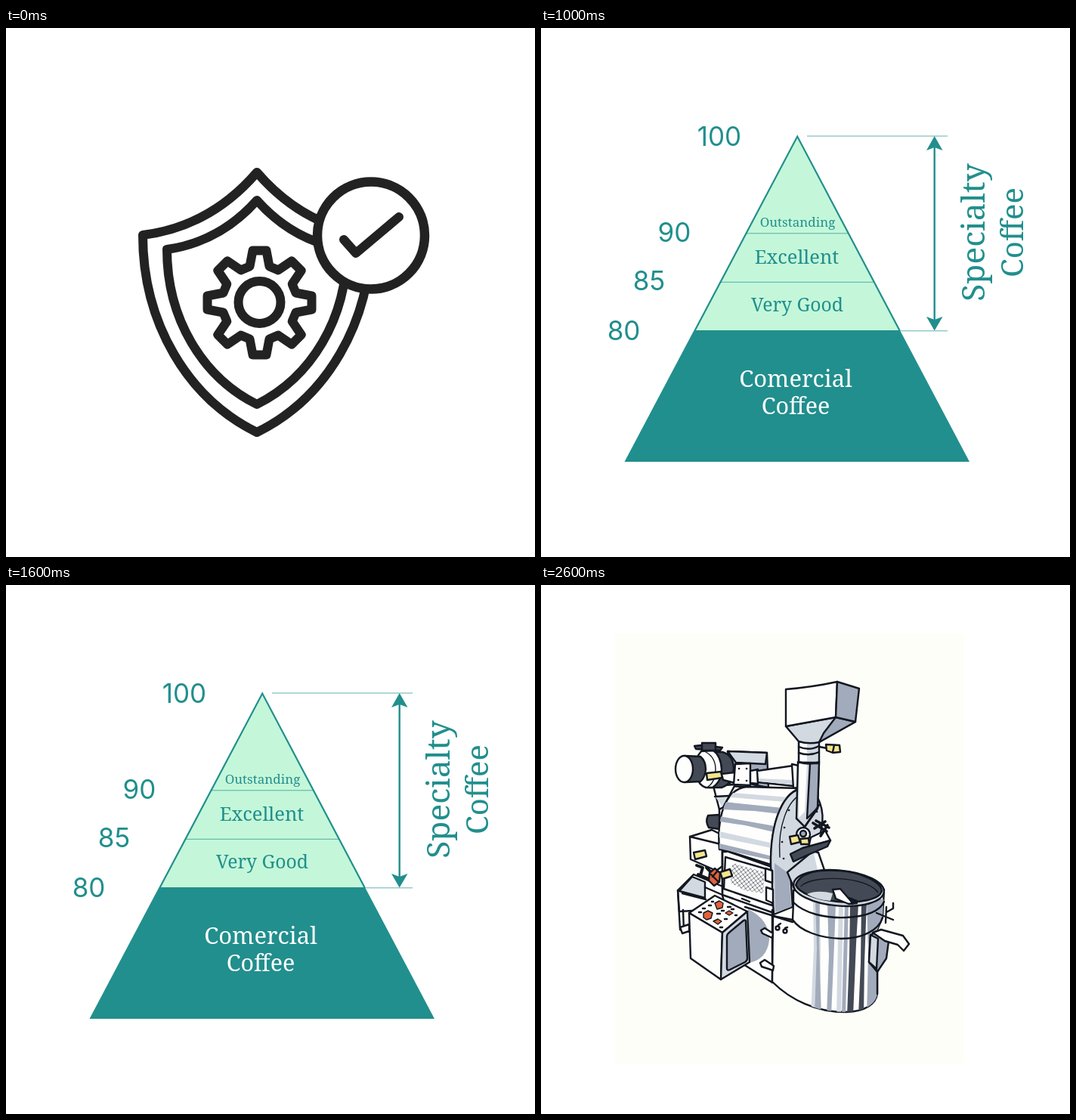
Write an HTML page that moves like this. It is 700x700 px and loops after 3 s.

```html
<!DOCTYPE html>
<html lang="en">
<head>
<meta charset="utf-8">
<title>Coffee quality</title>
<style>
html, body { margin: 0; width: 100%; height: 100%; overflow: hidden; background: #fff; }
svg { display: block; width: 100vw; height: 100vh; }
.scene { visibility: hidden; }
#shield { fill: none; stroke: #222; stroke-width: 12; stroke-linecap: round; stroke-linejoin: round; }
#chart { font-family: "Noto Serif", serif; fill: #218f8d; text-anchor: middle; }
#chart .score { font-family: Inter, sans-serif; }
#chart .rule { stroke: #218f8d; fill: none; }
#roaster { stroke: #121720; stroke-width: 2.4; stroke-linecap: round; stroke-linejoin: round; fill: none; }
.w { fill: #fefefd; }
.l { fill: #d3d9e1; }
.g { fill: #a2abbb; }
.d { fill: #434955; }
.k { fill: #171b24; }
.y { fill: #f5e58b; }
.r { fill: #e2623a; }
.flat { stroke: none; }
.thin { stroke-width: 1.4; }
</style>
</head>
<body>
<svg viewBox="0 0 700 700">
<defs>
  <pattern id="mesh" width="6" height="6" patternUnits="userSpaceOnUse" patternTransform="rotate(8)">
    <path d="M0 0L6 6M6 0L0 6" stroke="#3a404b" stroke-width=".7"/>
  </pattern>
  <clipPath id="drumClip"><path d="M236 350C232 300 247 270 272 267L342 269C318 278 304 315 304 368Z"/></clipPath>
  <clipPath id="binClip"><path d="M334 404L334 444L307 438L306 525C330 549 365 566 405 565C430 564 443 554 445 541L445 456L452 440L454 403C440 432 360 432 334 404Z"/></clipPath>
</defs>

<g class="scene" id="shield">
  <path d="M332 191Q270 263 181 274C181 390 240 490 332 535C424 490 483 390 483 274Q394 263 332 191Z"/>
  <path d="M332 228Q283 283 213 293C213 385 260 462 332 498C404 462 451 385 451 293Q381 283 332 228Z"/>
  <path id="gear"/>
  <circle cx="335.500" cy="363" r="28"/>
  <circle cx="483" cy="274.500" r="71" fill="#fff" stroke-width="12.500"/>
  <path d="M447 280L463 298L520 250"/>
</g>

<g class="scene" id="chart">
  <path d="M339 143L475 400.500H203Z" fill="#c4f7d9"/>
  <path d="M202.500 400H475L567 574H110.500Z"/>
  <path class="rule" stroke-width="2.200" d="M203.500 400.500L339.200 143.500L474.700 400.500"/>
  <path class="rule" opacity=".7" d="M271 271.800H406.500M237 336.300H440.500M352 143H538M474 400.800H538"/>
  <path class="rule" stroke-width="2.400" d="M520.700 155V389"/>
  <path d="M520.700 143L531.500 162L520.700 158L510 162ZM520.700 400.500L531.500 382L520.700 386L510 382Z"/>
</g>

<g class="scene" id="roaster">
  <path class="flat" fill="#fefef9" d="M97 64H560V633.500H97Z"/>

  <!-- motor and air duct -->
  <path class="g" d="M247 220L299 222L301 269L250 266Z"/>
  <path class="l" d="M247 220L299 222L297 237L258 235Z"/>
  <path class="w" d="M228 266L257 264L241 294L236 297Z"/>
  <path class="l flat" d="M231 281L246 280L240 293Z"/>
  <path d="M230 280L248 279M236 296V305"/>
  <path class="d" d="M236 304L221 305Q217 313 222 321L236 323Z"/>
  <path class="d" d="M222 221H240Q255 225 255 244Q254 263 239 268H222Z"/>
  <path class="w" d="M212 220Q203 230 204 245Q206 264 218 268H227Q239 260 239 244Q238 226 228 219Z"/>
  <path class="thin" d="M218 221Q231 228 231 244Q231 260 221 267"/>
  <path class="d" d="M190 226L211 227Q218 233 218 244Q217 255 211 260L190 261Z"/>
  <ellipse class="w" cx="189.500" cy="243.500" rx="11.500" ry="17.500"/>
  <path class="d" d="M203 213L213 212L240 215L237 219L205 217Z"/>
  <path class="d" d="M213 209H231V219H213Z"/>
  <path class="y" d="M219 249L238 247L240 255L220 258Z"/>
  <path class="w" d="M239 250L257 248V262L241 258Z"/>
  <path class="w" d="M257 237L277 236V265L255 264Z"/>
  <path stroke-width="2.600" d="M262 243h.1M272 243h.1M261 258h.1M272 259h.1"/>
  <path class="w" d="M277 246L287 244V263L277 262Z"/>
  <path class="w" d="M286 246L334 239V266L287 261Z"/>
  <path class="l flat" d="M288 256L333 258V264L288 260Z"/>
  <path d="M278 263Q300 270 337 271"/>
  <path class="w" d="M332 237L341 239V268L334 269Z"/>

  <!-- left housing -->
  <path class="w" d="M197 333L226 324L240 331V372L232 378L198 363Z"/>
  <path d="M197 333L238 343"/>
  <path class="w" d="M181 404L202 383L243 400L242 420L218 430L183 432Z"/>
  <path class="l" d="M200 386L217 393V414L183 405Z"/>
  <path d="M181 404L184 456M188 430L189 458M184 456L196 459M187 408L218 416"/>
  <path class="w" d="M184 453L196 449V458L187 461Z"/>
  <path stroke-width="4" d="M206 371L214 374L211 384M208 383L222 389M219 374L225 380"/>
  <path class="y" d="M202 354L217 351L219 359L204 363Z"/>

  <!-- cabinet -->
  <path class="w" d="M240 350L308 374V437L306 526L268 502L240 411Z"/>
  <path class="g flat" d="M274 429Q302 442 302 470Q299 495 276 500Z"/>
  <path d="M217 400L240 410L308 434M306 430V526M270 426L308 438"/>

  <!-- drum -->
  <path class="w" d="M236 350C232 300 247 270 272 267L342 269C318 278 304 315 304 370L240 350Z"/>
  <g class="flat" clip-path="url(#drumClip)">
    <path class="l" d="M254 275L328 281L324 287L250 281ZM236 326L312 343L310 349L236 334Z"/>
    <path class="g" d="M243 287L320 295L317 303L282 299L241 297ZM236 306L315 320L313 328L270 318L236 313ZM236 342L306 359L305 364L236 349Z"/>
  </g>
  <path class="l" d="M304 372C303 312 321 270 349 269C368 273 376 298 371 323C367 348 347 371 330 382L333 426L308 436Z"/>
  <path class="g flat" d="M309 368L328 382L331 426L310 433Z"/>
  <path class="thin" d="M316 360C313 320 326 283 347 276"/>
  <path stroke-width="2.600" d="M322 321h.1M319 340h.1M328 298h.1M321 362h.1M365 300h.1M362 345h.1"/>

  <!-- screened door -->
  <path class="w" d="M244 360L306 378V424L242 402Z"/>
  <path class="flat" fill="url(#mesh)" d="M253 368L296 380L294 408L269 404L251 394Z"/>
  <path class="w" d="M297 375L306 378V394L297 391ZM298 400L307 403V421L298 417Z"/>
  <path d="M266 415L276 419M240 351V408M242 353h3"/>
  <path class="r" d="M223 381L230 375L237 381L236 393L229 398L222 391Z"/>
  <path d="M225 383L234 392M233 379L227 386"/>
  <path class="y" d="M237 380L250 376L253 385L240 389Z"/>

  <!-- hopper -->
  <path class="l" d="M340 234H368L366 296L349 320L338 309Z"/>
  <path class="w flat" d="M342 236H352L349 300L341 308Z"/>
  <path class="g" d="M356 236H368L366 295L352 309Z"/>
  <path d="M338 309L349 320L368 291"/>
  <path class="l" d="M341 207H368V235H341Z"/>
  <path class="w flat" d="M343 209H352V233H343Z"/>
  <path d="M341 214Q355 220 368 213M341 222Q355 227 368 221M341 234Q355 239 368 234"/>
  <path class="l" d="M324 187L390 175L416 181L368 208Q354 211 341 207Z"/>
  <path class="g" d="M390 175L416 181L368 208L374 196Z"/>
  <path class="w" d="M324 138Q360 135 392 128L390 175L324 187Z"/>
  <path class="g" d="M392 128L421 137L416 181L390 175Z"/>
  <path d="M368 214L378 216"/>
  <path class="y" d="M377 211L395 212L396 221L386 222L378 219Z"/>
  <path d="M388 212L386 221"/>

  <!-- discharge door -->
  <path class="l" d="M326 380L360 352L367 354L378 386L336 404Z"/>
  <path class="w flat" d="M361 355L366 356L376 384L368 386Z"/>
  <path class="w" d="M357 334L376 325L383 338L354 347Z"/>
  <path class="d" d="M330 356L346 348L383 338L379 346L351 358L334 366Z"/>
  <circle class="w" cx="347" cy="330" r="9"/>
  <circle class="g" cx="347" cy="329" r="4"/>
  <path class="y" d="M329 333L340 331L343 340L331 343Z"/>
  <path class="y" d="M343 336L354 335L355 343L344 343Z"/>
  <path stroke-width="3.600" d="M360 315L378 326M364 312L381 321M362 322L376 313M370 332L379 318"/>

  <!-- cooling bin -->
  <path class="w" d="M334 404L334 420L333 443L307 438L306 525C330 549 365 566 405 565C430 564 443 554 445 541L445 456L452 440L454 403Z"/>
  <g class="flat" clip-path="url(#binClip)">
    <path class="l" d="M360 416L368 419L370 475L369 570H357L361 480ZM394 420H400L397 570H391Z"/>
    <path class="g" d="M363 416L369 418L368 475L371 570H362L365 480ZM379 422L390 424L387 500L384 570H378L381 490ZM402 420L407 420L403 570H398ZM431 416H456L443 570H431L433 490Z"/>
    <path class="d" d="M409 424L420 422L417 475L413 570H405L408 490ZM424 420L431 418L428 500L427 570H420L423 500Z"/>
  </g>
  <path d="M333 443C343 458 369 467 397 468C425 468 447 457 452 440M334 420C349 435 377 441 403 440C431 439 449 431 454 419M307 438L333 446"/>
  <g transform="rotate(5 394 401)">
    <ellipse class="l" cx="394" cy="401" rx="60" ry="23.500"/>
    <path class="d" d="M337 402C341 383 370 378 394 378C422 378 450 388 451 400C449 412 422 419 394 419C365 419 342 412 337 402Z"/>
    <path class="thin" d="M344 403C357 386 430 382 446 402"/>
  </g>
  <path class="flat l" d="M352 409Q366 403 386 408L383 418Q362 416 352 409Z"/>
  <path class="w" d="M386 403L396 402L410 418L418 421L407 422L390 415Z"/>
  <path class="k" d="M408 414L418 418L412 422Z"/>
  <path d="M444 434L466 443M457 426L456 447M457 433L466 428V421"/>
  <path class="g" d="M436 463L450 457L461 464L457 494L445 512L434 499Z"/>
  <path class="l" d="M436 463L446 468L444 508L434 499Z"/>
  <path class="w" d="M439 460L450 456L479 464L487 475L480 484L472 476L455 471Z"/>
  <path d="M445 510V541"/>

  <!-- latches -->
  <path class="w" d="M291 457L296 454L307 461L306 467L293 461ZM290 500L296 496L308 504L307 510L292 505Z"/>
  <circle class="w" cx="313" cy="454" r="2.500"/>
  <circle class="w" cx="323" cy="458" r="2.500"/>
  <path d="M314 450L317 448M323 454L326 453"/>

  <!-- control box -->
  <path class="w" d="M196 434L230 411L273 432L240 460Z"/>
  <path class="w" d="M196 434L240 460L238 522L198 494Z"/>
  <path class="l" d="M240 460L273 432L276 499L238 522Z"/>
  <path class="g" d="M246 465Q246 462 250 459L268 444Q271 442 271 446L273 494Q273 497 270 499L250 509Q246 511 246 507Z"/>
  <path class="r thin" d="M215 434L221 431L227 434L225 441L219 443L215 440ZM230 421L236 418L241 421L240 427L233 429ZM228 445L234 442L239 445L234 449ZM244 434L249 431L254 434L249 437Z"/>
  <path stroke-width="2.400" d="M209 433h3M214 428h3M222 424h3M226 419h2M233 435h4M239 431h3M247 426h4M252 429h3M243 442h3M237 453h3M257 437h2"/>
</g>
</svg>
<script>
const NS = "http://www.w3.org/2000/svg";
const LOOP = 3000;

function gearPath(cx, cy, teeth) {
  const tooth = [[-13, -48], [-9, -69], [9, -69], [13, -48]];
  const pts = [];
  for (let i = 0; i < teeth; i++) {
    const a = i * 2 * Math.PI / teeth, c = Math.cos(a), s = Math.sin(a);
    for (const [x, y] of tooth) pts.push(`${cx + x * c - y * s} ${cy + x * s + y * c}`);
  }
  return `M${pts.join("L")}Z`;
}
document.getElementById("gear").setAttribute("d", gearPath(335.5, 363.5, 8));

// text, x, baseline, size, extras
const score = { class: "score" };
const white = { fill: "#fff" };
const labels = [
  ["100", 236, 156, 35, score],
  ["90", 176.5, 282.5, 35, score],
  ["85", 143, 347, 35, score],
  ["80", 109.5, 412.5, 35, score],
  ["Outstanding", 339.5, 263, 17],
  ["Excellent", 338.5, 312, 25.5],
  ["Very Good", 339, 375, 24.8],
  ["Comercial", 337, 475, 31, white],
  ["Coffee", 337, 511, 30.5, white],
  ["Specialty", 587, 270.5, 42.5, { transform: "rotate(-90 587 270.5)" }],
  ["Coffee", 638, 270.5, 40, { transform: "rotate(-90 638 270.5)" }],
];
const chart = document.getElementById("chart");
for (const [text, x, y, size, extra] of labels) {
  const el = document.createElementNS(NS, "text");
  const attrs = { x, y, "font-size": size, ...extra };
  for (const name in attrs) el.setAttribute(name, attrs[name]);
  el.textContent = text;
  chart.append(el);
}

// Each scene holds for a third of the loop, with hard cuts.
const scenes = [...document.querySelectorAll(".scene")];
function draw() {
  const now = Math.floor(performance.now() % LOOP / LOOP * scenes.length);
  scenes.forEach((el, i) => el.style.visibility = i === now ? "visible" : "hidden");
  requestAnimationFrame(draw);
}
draw();
</script>
</body>
</html>
```
